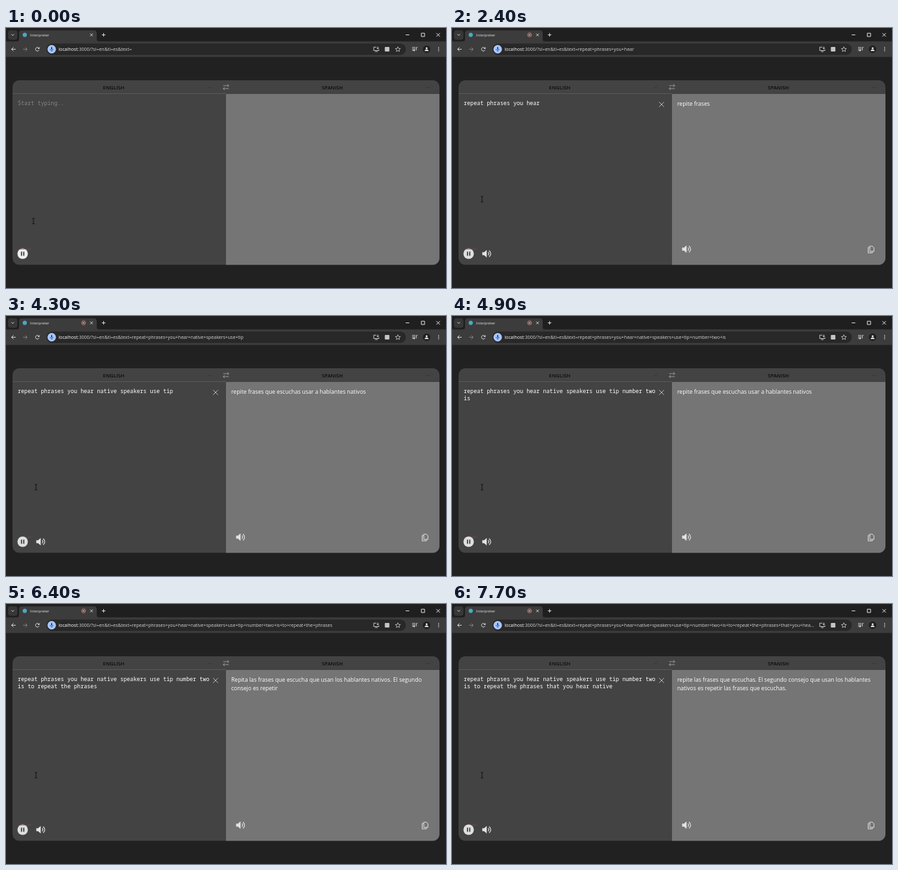
An HTML page with a canvas for the animation above (8000 ms loop, 674 by 398 pixels).

```html
<!DOCTYPE html>
<html lang="en">
<head>
<meta charset="utf-8">
<title>Interpreter</title>
<style>
  html, body { margin: 0; width: 100%; height: 100%; overflow: hidden; background: #212121; }
  canvas, svg { position: absolute; left: 0; top: 0; width: 674px; height: 398px; }
  text { font-family: "Open Sans", "Noto Sans", sans-serif; fill: #fff; white-space: pre; }
  .tab { font-size: 5.75px; fill: #e3e3e3; }
  .url { font-size: 7px; fill: #d2d2d2; }
  .host { fill: #fff; }
  .lang { font-size: 7.8px; font-weight: 600; fill: #0c0c0c; text-anchor: middle; }
  .src { font-family: "Noto Sans Mono", "DejaVu Sans Mono", monospace; font-size: 8.45px; }
  .hint { fill: #858585; }
  .out { font-size: 8.62px; }
</style>
</head>
<body>
<canvas id="stage"></canvas>
<svg viewBox="0 0 674 398">
  <text class="tab" x="37" y="12.8">Interpreter</text>
  <text class="url" x="80.5" y="35"><tspan class="host">localhost</tspan>:3000/?sl=en&amp;tl=es&amp;text=<tspan id="query"></tspan></text>
  <text class="lang" x="165" y="93.5">ENGLISH</text>
  <text class="lang" x="500" y="93.5">SPANISH</text>
  <text class="src" id="src0" x="18" y="118"></text>
  <text class="src" id="src1" x="18" y="129.3"></text>
  <text class="out" id="out0" x="345" y="119"></text>
  <text class="out" id="out1" x="345" y="131.5"></text>
</svg>
<script>
const LOOP = 8000, W = 674, H = 398, LINE_CHARS = 58;
const $ = id => document.getElementById(id);
const canvas = $('stage'), ctx = canvas.getContext('2d');
const dpr = window.devicePixelRatio || 1;
canvas.width = W * dpr;
canvas.height = H * dpr;
ctx.scale(dpr, dpr);

const SPEECH = 'repeat phrases you hear native speakers use tip number two is to repeat the phrases that you hear native'.split(' ');
// Time at which each spoken word is recognised
const HEARD = [1200, 1700, 2000, 2400, 2900, 3000, 3200, 4300, 4500, 4700, 4900,
  5300, 5600, 6000, 6300, 6500, 6800, 7100, 7500];
const OUTPUT = [
  [0, ''],
  [1900, 'repite'],
  [2300, 'repite frases'],
  [2600, 'repite las frases que escuchas'],
  [3600, 'repite frases que escuchas usar a hablantes nativos'],
  [5300, 'Repita las frases que escucha que usan los hablantes nativos. El segundo|consejo es'],
  [6000, 'Repita las frases que escucha que usan los hablantes nativos. El segundo|consejo es repetir'],
  [6600, 'Repita las frases que escucha que usan los hablantes nativos. El segundo|consejo es repetir las frases.'],
  [7600, 'repite las frases que escuchas. El segundo consejo que usan los hablantes|nativos es repetir las frases que escuchas.']
];
// Left end of the red level line
const LEVEL = [[0, 20], [300, 24], [1000, 20], [2600, 32], [2900, 20], [3600, 32],
  [4500, 20], [4800, 30], [5300, 32], [5600, 29], [6300, 20], [7500, 30]];

const clamp = v => Math.max(0, Math.min(1, v));
const ramp = (t, a, b) => clamp((t - a) / (b - a));
const at = (steps, t) => steps.filter(s => s[0] <= t).pop()[1];

function fill(color, x, y, w, h, r = 0) {
  ctx.fillStyle = color;
  ctx.beginPath();
  ctx.roundRect(x, y, w, h, r);
  ctx.fill();
}
function disc(color, x, y, r) {
  ctx.fillStyle = color;
  ctx.beginPath();
  ctx.arc(x, y, r, 0, 7);
  ctx.fill();
}
function ring(color, x, y, r, w, from = 0, to = 2 * Math.PI) {
  ctx.strokeStyle = color;
  ctx.lineWidth = w;
  ctx.beginPath();
  ctx.arc(x, y, r, from, to);
  ctx.stroke();
}
// SVG path data drawn around a point
function icon(d, x, y, color, w = 0) {
  const path = new Path2D(d);
  ctx.save();
  ctx.translate(x, y);
  ctx.lineWidth = w;
  ctx.strokeStyle = ctx.fillStyle = color;
  if (w) ctx.stroke(path); else ctx.fill(path);
  ctx.restore();
}

const CHEVRON = 'M-2 -1L0 1L2 -1';
const CROSS = 'M-1 -1L1 1M1 -1L-1 1';

function drawTabs(t) {
  fill('#1f1f1f', 0, 0, W, 21);
  fill('#373737', 3, 3.5, 14.5, 14.5, 4);
  icon(CHEVRON, 10.3, 10.5, '#e0e0e0', 1);
  icon('M16 21Q20 21 20 17V8Q20 3.5 24.5 3.5H134.5Q139 3.5 139 8V17Q139 21 143 21Z', 0, 0, '#3c3c3c');
  disc('#4aa9c2', 28.7, 10.5, 3.2);
  icon('M-2 -2L2 2M2 -2L-2 2', 131, 10.5, '#e3e3e3', 0.9);
  icon('M-2.7 0H2.7M0 -2.7V2.7', 149.5, 10.5, '#dcdcdc', 1);
  const live = ramp(t, 0, 300);
  if (live) {
    ctx.globalAlpha = live;
    ring('#d99a9a', 118.8, 10.5, 3, 0.8);
    disc('#e07f7f', 118.8, 10.5, 1.6);
    ctx.globalAlpha = 1;
  }
  icon('M-2.7 0H2.7', 615, 10.5, '#e6e6e6', 1);
  icon('M-2.5 -2.5H2.5V2.5H-2.5Z', 638.7, 10.5, '#e6e6e6', 1);
  icon('M-2.7 -2.7L2.7 2.7M2.7 -2.7L-2.7 2.7', 662, 10.5, '#e6e6e6', 1);
}

function drawToolbar() {
  fill('#3c3c3c', 0, 20.5, W, 24);
  fill('#282828', 62, 23.7, 550.5, 17.6, 8.8);
  icon('M3.3 0H-3M0 -3L-3 0L0 3', 11.5, 32.5, '#d8d8d8', 1);
  icon('M-3.3 0H3M0 -3L3 0L0 3', 29.5, 32.5, '#808080', 1);
  ring('#d8d8d8', 48, 32.5, 2.8, 1, 0.4, 5.5);
  icon('M3.4 -3.6V-.6H.4Z', 48, 32.5, '#d8d8d8');
  disc('#a8c7fa', 70, 32.5, 6.5);
  fill('#174ea6', 69, 28.9, 2, 4.2, 1);
  icon('M-2.3 -.3Q-2.3 2 0 2Q2.3 2 2.3 -.3M0 2V3.7', 70, 32.5, '#174ea6', 0.8);
  const ink = '#d6d6d6';
  icon('M0 -3.2H-4V2H4V.4M-2 3.6H2M2.3 -4V-.5M.6 -2L2.3 -.3L4 -2', 567.3, 32.5, ink, 0.9);
  fill('#c4c4c4', 580.3, 29, 7, 7, 1);
  icon('M0 -3.9L1.1 -1.3L3.9 -1.1L1.8 .7L2.4 3.4L0 2L-2.4 3.4L-1.8 .7L-3.9 -1.1L-1.1 -1.3Z', 600.3, 32.6, ink, 0.8);
  icon('M-4 -2.5H1.3M-4 -.3H1.3M-4 1.9H-1M2.6 2V-2.6H4.4', 626, 32.3, ink, 0.9);
  disc(ink, 625 + 0.3, 34.3, 1.2);
  disc('#1f1f1f', 644.3, 32.5, 5.7);
  disc('#f0f0f0', 644.3, 30.9, 1.5);
  icon('M-3 2.8Q-3 .6 0 .6Q3 .6 3 2.8Z', 644.3, 32.5, '#f0f0f0');
  for (const y of [29.8, 32.4, 35]) disc(ink, 662.7, y, 0.8);
}

function drawPanel() {
  fill('#212121', 0, 44.5, W, H - 44.5);
  fill('#434343', 10, 80, 654, 282.5, 10);
  fill('#757575', 337, 101, 327, 261.5, [0, 0, 10, 0]);
  fill('#606060', 10, 100.2, 327, 0.8);
  icon(CHEVRON, 312, 91, '#343434', 0.9);
  icon(CHEVRON, 646.5, 91, '#303030', 0.9);
  icon('M-4.3 -2.3H4.3M2 -4.5L4.3 -2.3L2 -.1M4.3 2.3H-4.3M-2 .1L-4.3 2.3L-2 4.5', 337, 90.5, '#a0a0a0', 0.9);
}

function drawSpeaker(x, y) {
  icon('M-6.8 -2.2H-4L0 -5.8V5.8L-4 2.2H-6.8Z', x, y, '#e2e2e2');
  ring('#e2e2e2', x + 0.6, y, 2.6, 1.1, -1, 1);
  ring('#e2e2e2', x + 0.6, y, 5.5, 1.2, -1, 1);
}

function drawControls(t) {
  disc(t < 200 ? '#efeeee' : '#dedede', 25.5, 345.5, 8);
  fill('#383838', 22.9, 342.4, 1.7, 6.2);
  fill('#383838', 26.4, 342.4, 1.7, 6.2);
  const x = at(LEVEL, t);
  fill('rgba(190,45,85,.75)', x, 338.2, 38 - x, 0.9);
  if (t >= HEARD[0]) {
    icon(CROSS.replace(/1/g, '3.7'), 321, 117, '#c6c6c6', 0.9);
    drawSpeaker(53.2, 345.5);
  }
  if (t >= OUTPUT[1][0]) {
    drawSpeaker(359.3, 338.5);
    icon('M-1.8 -5H2.2L4.6 -2.6V3H-1.8ZM-1.8 -3H-4.2V5.2H2.2V3', 641.7, 339, '#e2e2e2', 1);
  }
}

function drawCursor(t) {
  const x = 42 + 4 * ramp(t, 1700, 2100);
  const y = 295.5 - 33.5 * ramp(t, 0, 300);
  if (t >= 1200 && t < 2000) {
    ctx.lineJoin = 'round';
    const arrow = 'M-1 -5V3.5L1 1.7L2.4 4.7L3.7 4.1L2.4 1.2H4.8Z';
    icon(arrow, x, y, '#222', 1);
    icon(arrow, x, y, '#fff');
    ctx.lineJoin = 'miter';
  } else {
    icon('M-2 -4.2H-.6L0 -3.7L.6 -4.2H2M0 -3.7V3.7M-2 4.2H-.6L0 3.7L.6 4.2H2', x, y, '#0d0d0d', 0.9);
  }
}

function setText(id, value) {
  const el = $(id);
  if (el.textContent !== value) el.textContent = value;
}

function updateText(t) {
  const count = HEARD.filter(h => h <= t).length;
  const words = SPEECH.slice(0, count);
  let spoken = words.join(' ');
  if (t >= 1600 && t < 1700) spoken += ' PHR';
  const wrap = spoken.length > LINE_CHARS;
  setText('src0', count ? spoken.slice(0, LINE_CHARS) : 'Start typing..');
  setText('src1', wrap ? spoken.slice(LINE_CHARS + 1) : '');
  $('src0').classList.toggle('hint', !count);
  const query = words.join('+');
  setText('query', query.length > 98 ? query.slice(0, 96) + '...' : query);
  const [first, second = ''] = at(OUTPUT, t).split('|');
  setText('out0', first);
  setText('out1', second);
}

function render(now) {
  const t = Math.floor(now % LOOP / 100) * 100;
  drawTabs(t);
  drawToolbar();
  drawPanel();
  drawControls(t);
  drawCursor(t);
  updateText(t);
}

const start = performance.now();
function tick() {
  render(performance.now() - start);
  requestAnimationFrame(tick);
}
tick();
</script>
</body>
</html>
```
